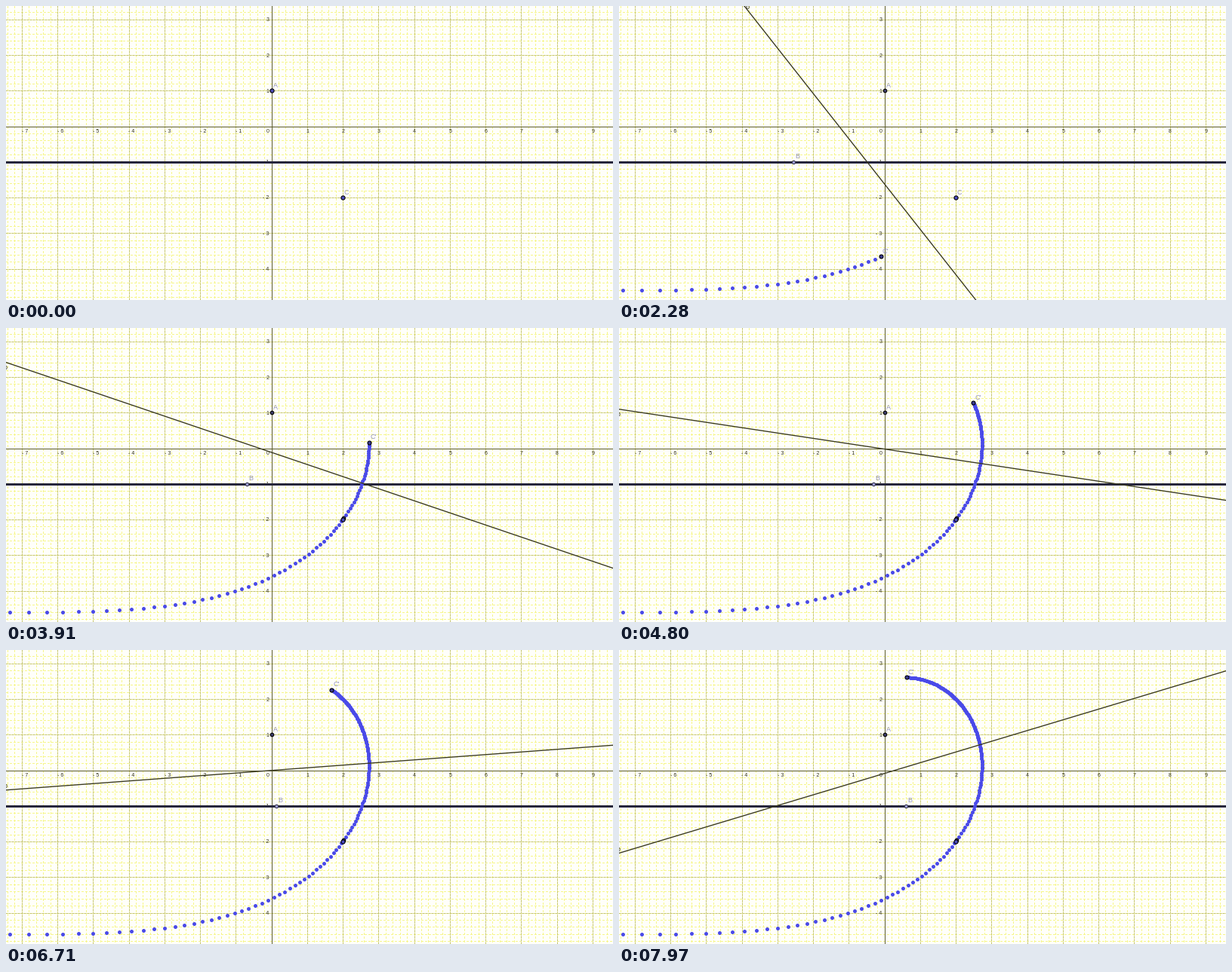
Recreate the animation shown at these times as a matplotlib script. Size 804x390 px, loop 8 s.

```python
import numpy as np
import matplotlib.pyplot as plt
from matplotlib.animation import FuncAnimation

W, H, DPI = 804, 390, 96
PX = 72 / DPI                      # points per pixel
OX, OY, UNIT = 351.5, 159.5, 47.25
LOOP, INTERVAL = 8000, 20
START, SHOT, STEP = 1140, 40.64, 34.89
MEET = 39                          # step at which C' has just passed C

INK = "#33331a"
LABEL = "#9494bc"
BLUE = "#4a4ae8"

plt.rcParams["font.family"] = "Liberation Sans"
fig = plt.figure(figsize=(W / DPI, H / DPI), dpi=DPI, facecolor="#fffffa")
ax = fig.add_axes([0, 0, 1, 1])
ax.set_xlim(0, W)
ax.set_ylim(H, 0)
ax.axis("off")


def to_px(x, y):
    return OX + UNIT * x, OY - UNIT * y


def rule(coords, vertical, color, width, dash="solid", z=1):
    draw = ax.vlines if vertical else ax.hlines
    draw(coords, 0, H if vertical else W, colors=color, linewidths=width * PX,
         linestyles=dash, zorder=z, antialiased=False)


def text(x, y, s, size, color, **kw):
    kw = {"ha": "center", "va": "center_baseline", "zorder": 8, **kw}
    return ax.text(x, y, s, fontsize=size * PX, color=color, **kw)


def point(fill, size, edge="black", z=7):
    return ax.plot([], [], "o", ms=size * PX, mfc=fill, mec=edge,
                   mew=1.1 * PX, zorder=z)[0]


def grid():
    minor = np.array([k for k in range(-40, 51) if k % 5]) / 5
    major = np.arange(-8, 11)
    for vertical in (True, False):
        axis = 0 if vertical else 1
        rule(to_px(minor, minor)[axis], vertical, "#f6f68c", 1, (0, (2, 2)))
        rule(to_px(major, major)[axis], vertical, "#dede9a", 1, z=2)
        rule(to_px(major, major)[axis], vertical, "#c4c470", 1, (0, (1, 2)), z=2)
    rule([OX], True, "#5c5c2c", 1, z=3)
    rule([OY], False, "#5c5c2c", 1, z=3)
    rule([W - 0.5], True, "#6c6c48", 1, z=3)
    rule([OY + UNIT], False, "#26263c", 1.4, z=4)


def tick_labels():
    for k in range(-7, 10):
        x = to_px(k, 0)[0]
        s = f"- {-k}" if k < 0 else str(k)
        shift = 4 if k < 0 else (0.5 if k else -5)
        text(x + shift, 165, s, 7, INK, zorder=3)
    for k in (-4, -3, -2, -1, 1, 2, 3):
        s = f"- {-k}" if k < 0 else str(k)
        text(348.5, to_px(0, k)[1], s, 7, INK, ha="right", zorder=3)


def base_at(step):
    """Abscissa of B: a steady parameter in (-1, 1) mapped to the whole line."""
    u = (np.asarray(step) - 127.667) / 150
    return u / (1 - np.abs(u))


def mirror(step):
    """Reflection of C = (2, -2) in the perpendicular bisector of AB."""
    m = base_at(step) / 2
    f = 2 * (2 * m + 2 - m * m) / (1 + m * m)
    return 2 - m * f, f - 2


def place(dot, label, x, y):
    dot.set_data([x], [y])
    label.set_position((x + 2, y - 8))


def point_label(s):
    return text(-50, -50, s, 9, LABEL, ha="left")


grid()
tick_labels()

trace, = ax.plot([], [], "o", ms=5 * PX, mfc=BLUE, mec="none", zorder=5)
bisector, = ax.plot([], [], color="#383820", lw=1.35 * PX, zorder=6)
line_label = text(0, 0, "b", 9, INK, ha="right")
met = point("#3c3c90", 4.6)
dot_a, dot_b = point("#4c4cb4", 5.2), point("#a0a0d8", 4.4, "#38384c")
dot_c, dot_m = point("#4c4cc0", 5.2), point("#3c3c90", 5)
name_a, name_b, name_c, name_m = map(point_label, ("A", "B", "C", "C'"))
place(dot_a, name_a, *to_px(0, 1))
place(dot_c, name_c, *to_px(2, -2))
met.set_data(*[[v] for v in to_px(*mirror(MEET))])
moving = (trace, bisector, line_label, dot_b, name_b, dot_m, name_m)


def update(i):
    shot = int(np.floor((i * INTERVAL + 10 - START) / SHOT))
    n = int(np.floor((START + shot * SHOT - 1546) / STEP))
    running = shot >= 0
    for artist in moving:
        artist.set_visible(running)
    met.set_visible(running and n >= MEET)
    name_c.set_visible(not running or n < MEET)
    dot_a.set_markerfacecolor("#40406e" if running else "#4c4cb4")
    dot_a.set_markersize((4.6 if running else 5.2) * PX)
    if not running:
        return

    b = float(base_at(n))
    m = b / 2
    ends = np.array([-60, W + 60])
    bisector.set_data(ends, OY - UNIT * (m * (ends - OX) / UNIT - m * m))
    left = OY - UNIT * (m * -OX / UNIT - m * m)
    if left < 0:
        top = OX + (OY / UNIT + m * m) / m * UNIT
        line_label.set_position((top + 6, 0))
    else:
        line_label.set_position((1.5, left + (6 if m < 0 else -6)))

    place(dot_b, name_b, *to_px(b, -1))
    place(dot_m, name_m, *to_px(*mirror(n)))
    trace.set_data(*to_px(*mirror(np.arange(-6, n + 1))))


anim = FuncAnimation(fig, update, frames=LOOP // INTERVAL, interval=INTERVAL,
                     init_func=lambda: update(0), repeat=True, repeat_delay=0,
                     blit=False)
plt.show()
```
